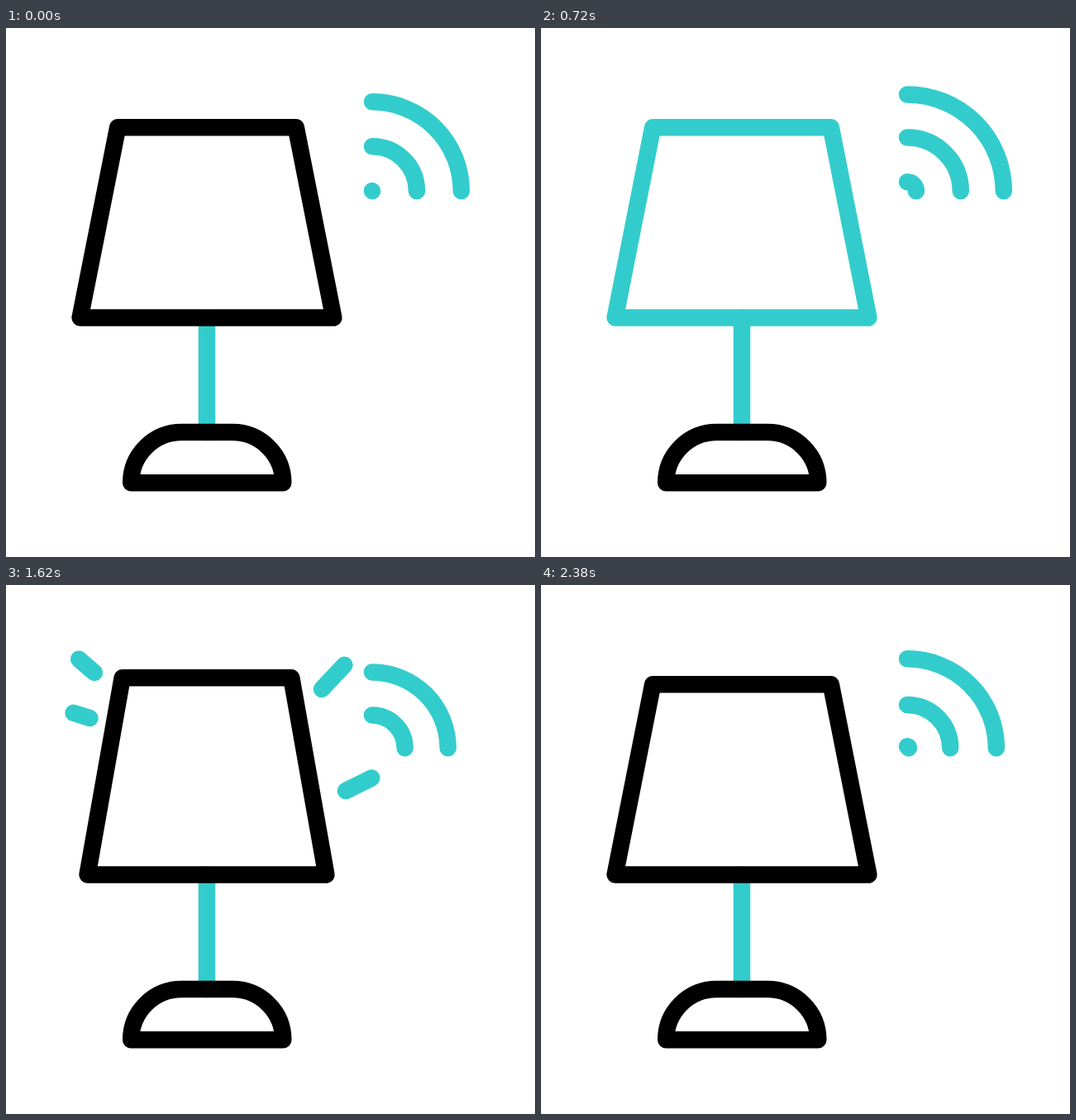
An HTML page with a canvas for the animation above (2.4 s loop, 640x640 px).

```html
<!DOCTYPE html>
<html>
<head>
<meta charset="utf-8">
<title>Smart lamp</title>
<style>
  html, body { margin: 0; height: 100%; overflow: hidden; background: #fff; }
  canvas { display: block; }
</style>
</head>
<body>
<canvas width="640" height="640"></canvas>
<script>
const ctx = document.querySelector('canvas').getContext('2d');
const LOOP = 2400, TEAL = '#33cccc', BLACK = '#000', CX = 243;

// Start times of the signal waves, in ms
const WAVES = [-1200, -600, 0, 600, 1180, 1800, 2360];
const WAVE_SPEED = 0.0898, WAVE_MAX = 116.8, WAVE_LIFE = 1340;

// Shade bounce: time, top edge shift, bottom and top half-width changes
const BOUNCE = [
  [0, 0, 0, 0],
  [220, 19.4, 9.7, 7.9],
  [376, -8.9, -10, -6.1],
  [600, 0, 0, 0]
];
const SWITCH = 360;

// Light rays: inner x, y, outer x, y
const RAYS = [
  [107, 106, 85, 87],
  [101.5, 161, 78.3, 153.8],
  [382, 126, 414, 92],
  [411, 249, 447.5, 231]
];

const clamp = x => Math.min(1, Math.max(0, x));
const progress = (t, from, to) => clamp((t - from) / (to - from));
const smooth = u => u * u * (3 - 2 * u);
const mix = (a, b, u) => a + (b - a) * u;

function stroke(color, draw) {
  ctx.strokeStyle = color;
  ctx.beginPath();
  draw();
  ctx.stroke();
}

function bounceAt(t) {
  const next = BOUNCE.findIndex(key => key[0] > t);
  if (next < 1) return [0, 0, 0];
  const a = BOUNCE[next - 1], b = BOUNCE[next];
  const u = smooth(progress(t, a[0], b[0]));
  return [1, 2, 3].map(i => mix(a[i], b[i], u));
}

function drawWaves(t) {
  for (const start of WAVES) {
    const age = t - start;
    if (age < 0 || age >= WAVE_LIFE) continue;
    const r = Math.max(0.1, Math.min(WAVE_MAX, age * WAVE_SPEED));
    stroke(TEAL, () => ctx.arc(443, 197.2, r, -Math.PI / 2, 0));
  }
}

function drawRays(t) {
  const head = progress(t, 360, 431), tail = progress(t, 431, 530);
  if (head === 0 || tail === 1) return;
  for (const [x0, y0, x1, y1] of RAYS) {
    stroke(TEAL, () => {
      ctx.moveTo(mix(x0, x1, tail), mix(y0, y1, tail));
      ctx.lineTo(mix(x0, x1, head), mix(y0, y1, head));
    });
  }
}

function drawLamp(t, color) {
  stroke(TEAL, () => {
    ctx.moveTo(CX, 350.5);
    ctx.lineTo(CX, 489);
  });
  stroke(BLACK, () => {
    ctx.arc(212.5, 550.3, 61.3, Math.PI, Math.PI * 1.5);
    ctx.arc(274, 550.3, 61.3, -Math.PI / 2, 0);
    ctx.closePath();
  });
  const [dy, bottom, top] = bounceAt(t);
  const topHalf = 107.8 + top, bottomHalf = 153.4 + bottom, y = 120.2 + dy;
  stroke(color, () => {
    ctx.moveTo(CX - topHalf, y);
    ctx.lineTo(CX + topHalf, y);
    ctx.lineTo(CX + bottomHalf, 350.6);
    ctx.lineTo(CX - bottomHalf, 350.6);
    ctx.closePath();
  });
}

function render(now) {
  const t = now % LOOP, phase = t % (LOOP / 2);
  const lit = t >= SWITCH && t < SWITCH + LOOP / 2;
  ctx.fillStyle = '#fff';
  ctx.fillRect(0, 0, 640, 640);
  ctx.lineWidth = 20.5;
  ctx.lineCap = ctx.lineJoin = 'round';
  drawWaves(t);
  drawRays(phase);
  drawLamp(phase, lit ? TEAL : BLACK);
}

function tick() {
  render(performance.now());
  requestAnimationFrame(tick);
}
tick();
</script>
</body>
</html>
```
